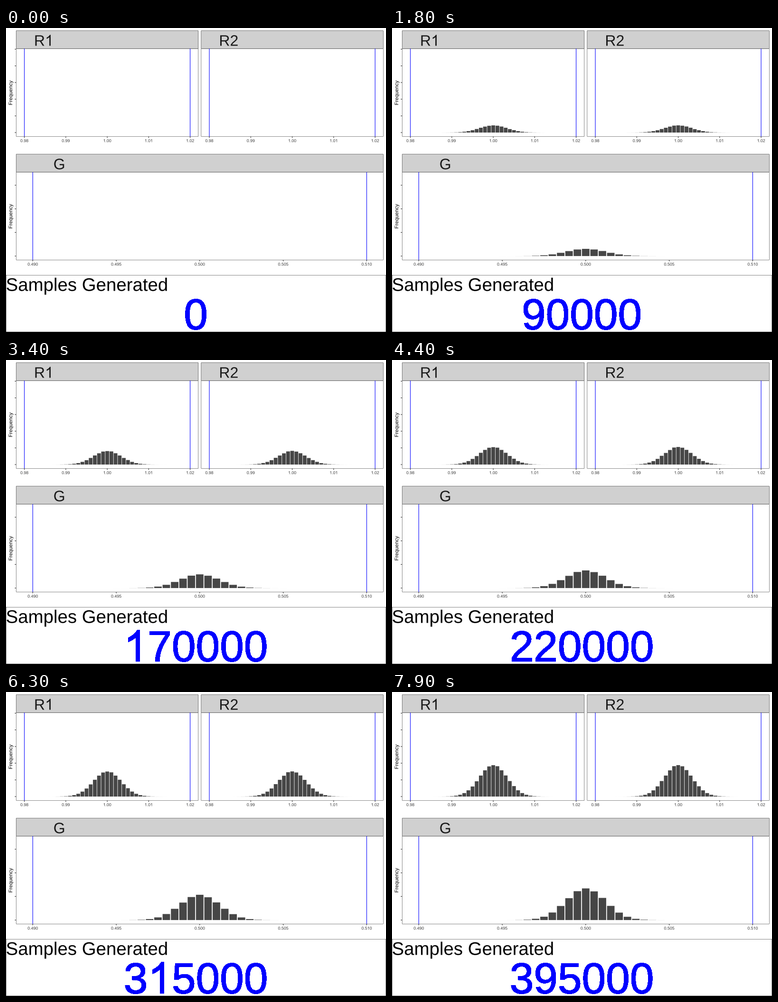
Animation of 800x640 px, one loop 8 s. Source, as a matplotlib script:

```python
import numpy as np
import matplotlib.pyplot as plt
from matplotlib.animation import FuncAnimation
from matplotlib.collections import PolyCollection
from matplotlib.patches import PathPatch, Rectangle
from matplotlib.path import Path
from matplotlib.textpath import TextPath
from matplotlib.transforms import Affine2D

W, H = 800, 640
FRAMES, INTERVAL, BATCH = 80, 100, 5000
FONT = {"family": "Liberation Sans"}
PX = 0.72  # points per pixel at 100 dpi
LINE = 1.07
BAR, STRIP, EDGE = "#464646", "#d0d0d0", "#222222"

fig = plt.figure(figsize=(W / 100, H / 100), dpi=100, facecolor="white")
ax = fig.add_axes([0, 0, 1, 1])
ax.set_xlim(0, W)
ax.set_ylim(H, 0)
ax.axis("off")

# A footless "1", in 2048 units per em.
ONE = Path(
    [(763, 0), (583, 0), (583, 1147), (518, 1085), (412.5, 1023), (307, 961),
     (223, 930), (223, 1104), (374, 1175), (487, 1276), (600, 1377),
     (647, 1472), (763, 1472), (763, 0)],
    [1, 2, 2, 3, 3, 3, 3, 2, 3, 3, 3, 3, 2, 79])
ADVANCE = {".": 0.278, "R": 0.722}


def text_path(s, size):
    """Outline of s and its width, with the baseline at y = 0."""
    if not any(c.isdigit() for c in s):
        path = TextPath((0, 0), s, size=size, prop=FONT)
        return path, path.get_extents().x1
    parts, x = [], 0
    for c in s:
        if c == "1":
            glyph = ONE.transformed(Affine2D().scale(size / 2048).translate(x, 0))
        else:
            glyph = TextPath((x, 0), c, size=size, prop=FONT)
        parts.append(glyph)
        x += ADVANCE.get(c, 0.5562) * size
    return Path.make_compound_path(*parts), x


def place(s, x, y, size, hjust=0.0, angle=0):
    path, width = text_path(s, size)
    move = Affine2D().translate(-hjust * width, 0).rotate_deg(angle)
    return path.transformed(move.scale(1, -1).translate(x, y))


def label(s, x, y, size, color="black", **kw):
    ax.add_patch(PathPatch(place(s, x, y, size, **kw), fc=color, lw=0))


def line(x0, y0, x1, y1, color):
    ax.plot([x0, x1], [y0, y1], color=color, lw=LINE * PX,
            solid_capstyle="butt", snap=False)


def box(x0, y0, x1, y1, fill):
    """Filled box whose border shows only its inner half."""
    inset = LINE / 4
    ax.add_patch(Rectangle((x0, y0), x1 - x0, y1 - y0, fc=fill, lw=0, snap=False))
    ax.add_patch(Rectangle((x0 + inset, y0 + inset), x1 - x0 - 2 * inset,
                           y1 - y0 - 2 * inset, fc="none", ec=EDGE,
                           lw=LINE / 2 * PX, snap=False))


class Panel:
    """Facet with a strip, two limit lines, axes and a growing histogram."""

    def __init__(self, title, left, right, top, x_ticks, y_ticks, y_title,
                 bin_width, sigma, scale, seed):
        mid, bottom = top + 38, top + 223
        pad = (right - left) / 22
        lo, hi = left + pad, right - pad

        for x in (lo, hi):
            line(x, mid, x, bottom, "blue")
        box(left, mid, right, bottom, "none")
        box(left, top, right, mid, STRIP)
        label(title, left + 0.1 * (right - left) + 3.5, top + 31.9, 32,
              "#1a1a1a", hjust=0.1)
        for x, s in zip(np.linspace(lo, hi, 5), x_ticks):
            line(x, bottom, x, bottom + 2.75, EDGE)
            label(s, x, top + 234.8, 8.8, "#3c3c3c", hjust=0.5)
        if y_title:
            for y in y_ticks:
                line(left - 2.75, y, left, y, EDGE)
            label("Frequency", 13.3, top + 131, 11, hjust=0.5, angle=90)

        k = np.arange(-20, 21)
        p = np.exp(-0.5 * (k / sigma) ** 2)
        draws = np.random.default_rng(seed).multinomial(
            BATCH, p / p.sum(), size=FRAMES - 1)
        counts = np.vstack([np.zeros((1, k.size)), draws.cumsum(axis=0)])
        step = (hi - lo) * bin_width
        self.heights = counts * scale
        self.x, self.half = (lo + hi) / 2 + k * step, 0.45 * step
        self.base = y_ticks[0]
        self.bars = PolyCollection([], facecolors=BAR, linewidths=0, snap=False)
        ax.add_collection(self.bars, autolim=False)

    def show(self, i):
        b = self.base
        self.bars.set_verts([
            [(x - self.half, b), (x + self.half, b),
             (x + self.half, b - h), (x - self.half, b - h)]
            for x, h in zip(self.x, self.heights[i]) if h > 0])


LEFT, RIGHT, GAP = 21.2, 794.5, 5.5
half = (RIGHT - LEFT - GAP) / 2
r_axes = dict(top=5.5, x_ticks=[f"{v:.2f}" for v in np.linspace(0.98, 1.02, 5)],
              y_ticks=220.1 - 35.1 * np.arange(6),
              bin_width=1 / 40, sigma=3.333, scale=35.1 / 25000)
g_axes = dict(top=265.5, x_ticks=[f"{v:.3f}" for v in np.linspace(0.49, 0.51, 5)],
              y_ticks=480.1 - 49.7 * np.arange(4),
              bin_width=1 / 40, sigma=2.357, scale=49.7 / 50000)
panels = [
    Panel("R1", LEFT, LEFT + half, y_title=True, seed=3, **r_axes),
    Panel("R2", RIGHT - half, RIGHT, y_title=False, seed=8, **r_axes),
    Panel("G", LEFT, RIGHT, y_title=True, seed=21, **g_axes),
]

box(0, 520, W, H, "white")
label("Samples Generated", -0.3, 553.5, 38.4)
counter = ax.add_patch(PathPatch(ONE, fc="blue", ec="blue", lw=0.5 * PX,
                                 antialiased=False))


def update(i):
    for panel in panels:
        panel.show(i)
    counter.set_path(place(str(BATCH * i), 399.6, 634.3, 91, hjust=0.5))
    return [p.bars for p in panels] + [counter]


anim = FuncAnimation(fig, update, frames=FRAMES, interval=INTERVAL,
                     init_func=lambda: update(0), repeat=True, repeat_delay=0)
plt.show()
```
